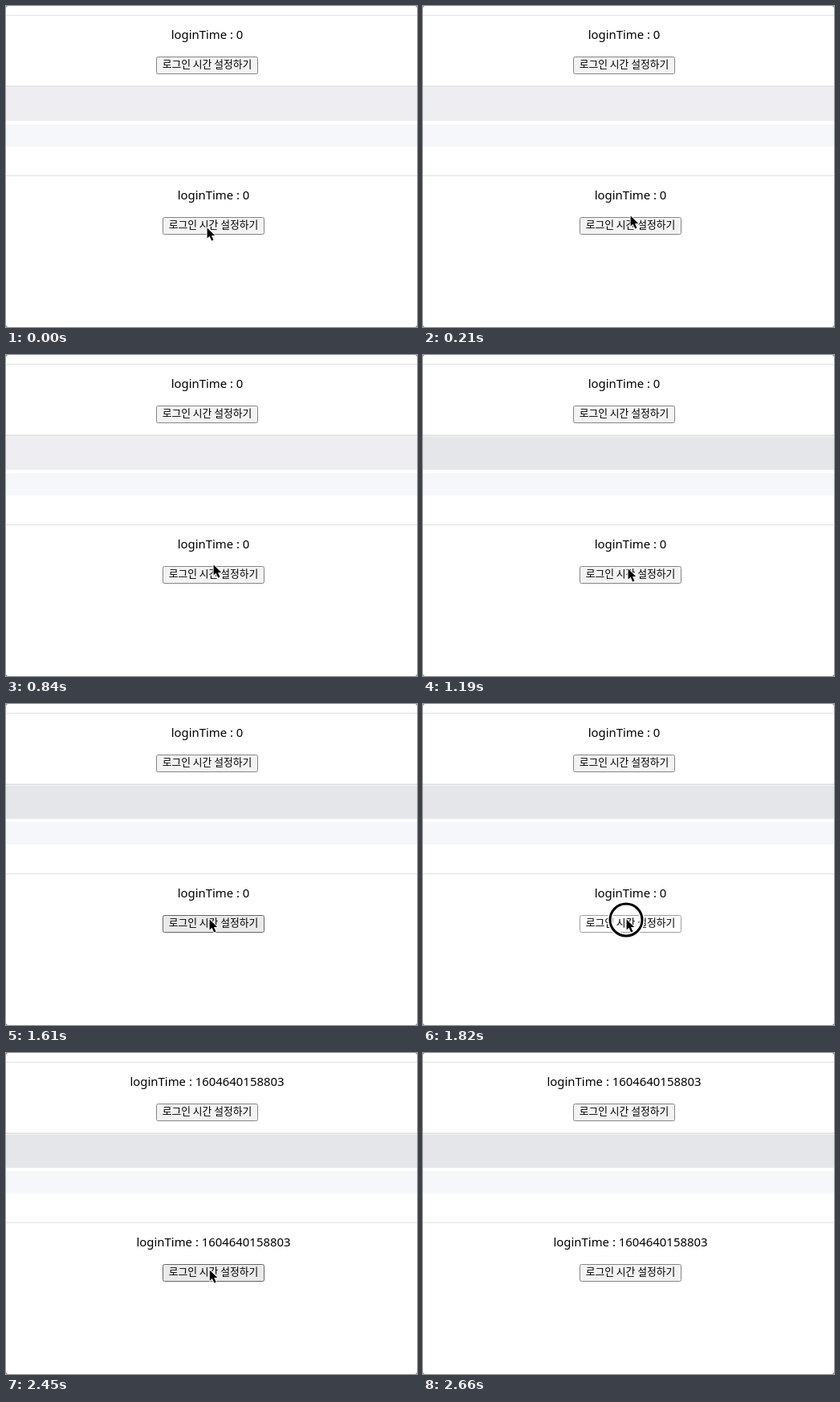
These frames come from a looping animation (512 by 400 pixels, 2800 ms). An HTML page with a canvas:

```html
<!DOCTYPE html>
<html lang="ko">
<head>
<meta charset="utf-8">
<style>
html, body { margin: 0; width: 100%; height: 100%; overflow: hidden; background: #fff; }
canvas { display: block; width: 512px; height: 400px; }
</style>
</head>
<body>
<canvas id="stage" width="512" height="400"></canvas>
<script>
const ctx = document.getElementById('stage').getContext('2d');
const LOOP = 2800, STEP = 70;
const SHADE = 1050, HOVER = 1610, PRESS = 1820, RELEASE = 1960, LEAVE = 2520;

const LATIN = '14.9px "Noto Sans", "Open Sans", sans-serif';
const HANGUL = '12.8px "Noto Sans CJK KR", "Noto Sans CJK", sans-serif';
const IDLE = { fill: '#f3f3f3', border: '#858585' };
const HOVERED = { fill: '#eaeaea', border: '#666' };
const PRESSED = { fill: '#fdfdfd', border: '#a0a0a0' };

// The pointer rests between these moves
const start = { x: 250, y: 276 };
const moves = [
  { from: 0, to: 210, x: 258, y: 261 },
  { from: 350, to: 700, x: 258, y: 188 },
  { from: 700, to: 840, x: 258, y: 261 },
  { from: 910, to: 1190, x: 255, y: 266 },
  { from: 1540, to: 1610, x: 253, y: 268 },
  { from: 2380, to: 2660, x: 268, y: 410 }
];

const easeIn = k => k ** 3;

function pointerAt(t) {
  let { x, y } = start;
  for (const m of moves) {
    const k = easeIn(Math.min(1, Math.max(0, (t - m.from) / (m.to - m.from))));
    x += (m.x - x) * k;
    y += (m.y - y) * k;
  }
  return { x, y };
}

function bar(y, h, color) {
  ctx.fillStyle = color;
  ctx.fillRect(0, y, 512, h);
}

function label(text, x, y, font) {
  ctx.font = font;
  ctx.textAlign = 'center';
  ctx.fillStyle = '#000';
  ctx.fillText(text, x, y);
}

function panel(cx, top, value, look) {
  bar(top, 1, '#e2e2e3');
  label('loginTime : ' + value, cx, top + 30, LATIN);
  ctx.beginPath();
  ctx.roundRect(cx - 63, top + 52.5, 126, 21, 2);
  ctx.fillStyle = look.fill;
  ctx.fill();
  ctx.lineWidth = 1;
  ctx.strokeStyle = look.border;
  ctx.stroke();
  label('로그인 시간 설정하기', cx, top + 66, HANGUL);
}

function divider() {
  bar(99, 1, '#ececec');
  bar(100, 1, '#dedede');
  bar(101, 1, '#f4f4f5');
}

function ring(x, y) {
  ctx.beginPath();
  ctx.arc(x, y, 20, 0, Math.PI * 2);
  for (const [width, color] of [[6, '#fff'], [3, '#000']]) {
    ctx.lineWidth = width;
    ctx.strokeStyle = color;
    ctx.stroke();
  }
}

const arrow = new Path2D('M.6 .6V13.6L3.6 10.8L6.2 16.4L8.5 15.4L6 9.9H10.2Z');

function pointer(x, y) {
  ctx.save();
  ctx.translate(x, y);
  ctx.lineJoin = 'round';
  ctx.lineWidth = 2;
  ctx.strokeStyle = '#fff';
  ctx.stroke(arrow);
  ctx.fillStyle = '#000';
  ctx.fill(arrow);
  ctx.restore();
}

// Slivers left outside the rounded window
function corners() {
  ctx.fillStyle = '#8c8c8c';
  for (const x of [0, 512]) for (const y of [0, 400]) {
    ctx.beginPath();
    ctx.moveTo(x, y);
    ctx.lineTo(x + (x ? -2 : 2), y);
    ctx.lineTo(x, y + (y ? -2 : 2));
    ctx.fill();
  }
}

function draw(t) {
  const value = t < RELEASE ? '0' : '1604640158803';
  const pressed = t >= PRESS && t < RELEASE;
  const hovered = t >= HOVER && t < LEAVE;

  bar(0, 400, '#fff');
  divider();
  bar(102, 41, t < SHADE ? '#ededf2' : '#e5e6ea');
  bar(147, 28, '#f6f7fa');
  panel(250.5, 11, value, IDLE);
  panel(258.5, 211, value, pressed ? PRESSED : hovered ? HOVERED : IDLE);

  const { x, y } = pointerAt(t);
  if (pressed) ring(x, y + 1);
  pointer(x, y);
  corners();
}

function tick() {
  const t = performance.now() % LOOP;
  draw(Math.floor(t / STEP) * STEP);
  requestAnimationFrame(tick);
}
tick();
</script>
</body>
</html>
```
